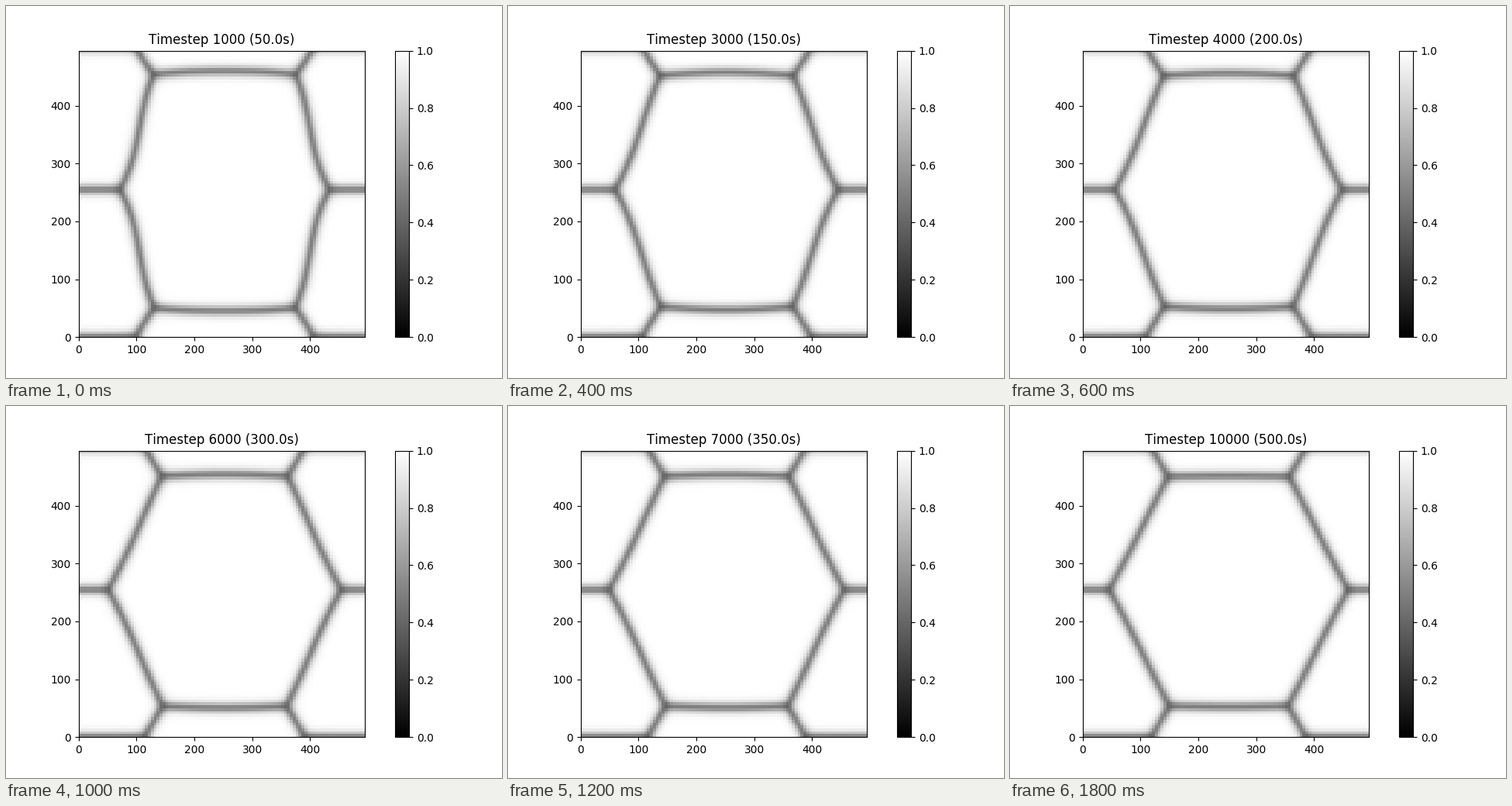
Write a matplotlib script that moves like this. It is 640 px wide and 480 px high and loops after 2 s.

```python
import numpy as np
import matplotlib.pyplot as plt
from matplotlib.animation import FuncAnimation

W, H = 640, 480
N = 100            # grid points per side, periodic
DX = 5             # plotted spacing of grid points
DT = 0.1           # seconds per solver step
KAPPA = 1.3        # gradient coefficient: boundary width and speed
FRAMES = 10
SECONDS = 50       # simulated time between frames
SETTLE = 50        # relaxation of the blocky start before the clock runs

plt.rcParams["text.kerning_factor"] = 6


def start_grains():
    """Four grains: a central block, one above/below it, two at the sides."""
    y, x = np.mgrid[:N, :N]
    middle = (x >= 21) & (x <= 79)
    block = middle & (y >= 9) & (y <= 91)
    lower = ~middle & (y <= 50)
    upper = ~middle & (y > 50)
    return np.array([block, middle & ~block, lower, upper], dtype=float)


def laplacian(a):
    return (np.roll(a, 1, 1) + np.roll(a, -1, 1)
            + np.roll(a, 1, 2) + np.roll(a, -1, 2) - 4 * a)


def grow(eta, seconds):
    """Curvature-driven grain growth with a multi-phase-field model."""
    for _ in range(round(seconds / DT)):
        sq = eta * eta
        total = sq.sum(axis=0)
        eta = eta + DT * (KAPPA * laplacian(eta)
                          - eta * (3 * total - 2 * sq - 1))
    return eta


fields = []
eta = grow(start_grains(), SETTLE)
for _ in range(FRAMES):
    eta = grow(eta, SECONDS)
    fields.append((eta ** 2).sum(axis=0)[:-1, :-1])


def add_axes(fig, left, bottom, width, height):
    return fig.add_axes([left / W, bottom / H, width / W, height / H])


fig = plt.figure(figsize=(W / 100, H / 100), dpi=100, facecolor="white")
ax = add_axes(fig, 93.6, 52.8, 369.6, 369.6)
cax = add_axes(fig, 501.6, 52.8, 18.48, 369.6)

edges = np.arange(N) * DX
mesh = ax.pcolormesh(edges, edges, fields[0], cmap="gray", vmin=0, vmax=1)
ax.set_xticks(range(0, 500, 100))
ax.set_yticks(range(0, 500, 100))
ax.set_xlim(0, edges[-1])
ax.set_ylim(0, edges[-1])
fig.colorbar(mesh, cax=cax)
title = ax.set_title("")


def update(i):
    step = 1000 * (i + 1)
    mesh.set_array(fields[i])
    title.set_text(f"Timestep {step} ({step * 0.05:.1f}s)")
    return mesh, title


anim = FuncAnimation(fig, update, frames=FRAMES, interval=200,
                     repeat=True, repeat_delay=0, blit=False)
plt.show()
```
